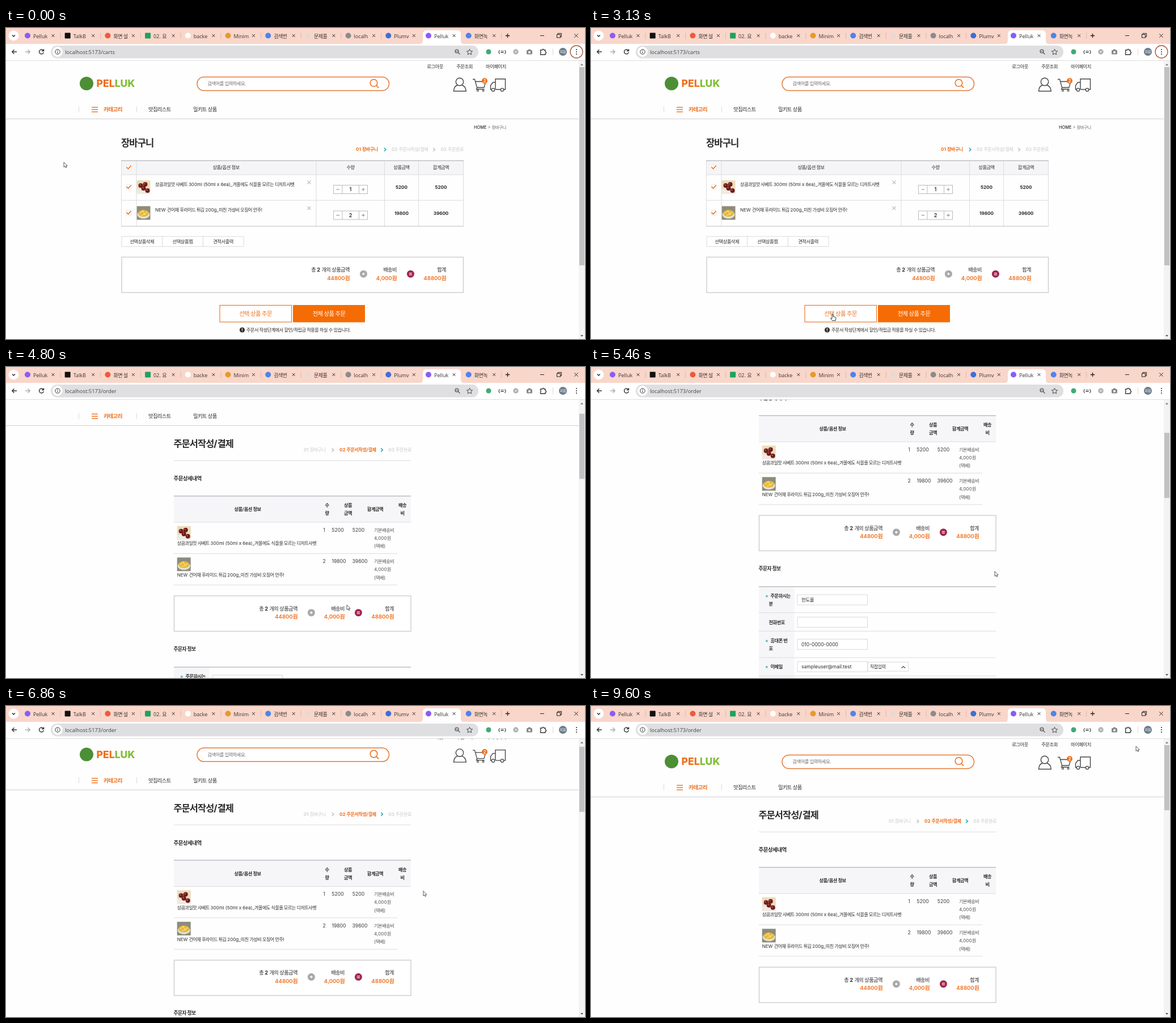
Recreate the animation shown at these times as an HTML page. Size 1021 by 549 pixels, loop 9670 ms.

```html
<!DOCTYPE html>
<html lang="ko">
<head>
<meta charset="utf-8">
<title>장바구니</title>
<style>
  html, body { margin: 0; width: 100%; height: 100%; overflow: hidden; background: #fefefe; }
  svg { display: block; width: 1021px; height: 549px; }
  text { font-family: Inter, "Noto Sans CJK KR", "Noto Sans CJK", sans-serif; white-space: pre; }
  .ui { font-family: "Open Sans", "Noto Sans CJK KR", "Noto Sans CJK", sans-serif; }
</style>
</head>
<body>
<svg id="stage" viewBox="0 0 1021 549"></svg>
<script>
const LOOP = 9670, NAVIGATE = 3560;
const ORANGE = '#ee6f1c', INK = '#2b2b2b', GRAY = '#c9c9cb', TEAL = '#48b0b8';

// Drawing helpers, each returning SVG markup
const text = (x, y, s, size = 8.2, { fill = INK, weight = 400, anchor = 'start', cls = '' } = {}) =>
  `<text x="${x}" y="${y}" font-size="${size}" fill="${fill}" font-weight="${weight}" text-anchor="${anchor}" class="${cls}">` +
  s.replace(/[가-힣][가-힣 ]*/g, run => `<tspan letter-spacing="-.056em">${run}</tspan>`) + '</text>';
const mid = (x, y, s, size, style) => text(x, y, s, size, { anchor: 'middle', ...style });
const end = (x, y, s, size, style) => text(x, y, s, size, { anchor: 'end', ...style });
const rect = (x1, y1, x2, y2, fill, stroke = 'none', width = 1, r = 0) =>
  `<rect x="${x1}" y="${y1}" width="${x2 - x1}" height="${y2 - y1}" rx="${r}" fill="${fill}" stroke="${stroke}" stroke-width="${width}"/>`;
const circle = (x, y, r, fill, stroke = 'none', width = 1) =>
  `<circle cx="${x}" cy="${y}" r="${r}" fill="${fill}" stroke="${stroke}" stroke-width="${width}"/>`;
const path = (d, stroke = INK, width = 1, fill = 'none') =>
  `<path d="${d}" fill="${fill}" stroke="${stroke}" stroke-width="${width}"/>`;
const hline = (x1, x2, y, color = '#dcdce0', width = 1) => path(`M${x1} ${y}H${x2}`, color, width);
const vline = (x, y1, y2, color = '#dcdce0', width = 1) => path(`M${x} ${y1}V${y2}`, color, width);
const cross = (x, y, r, color = INK, width = 1) =>
  path(`M${x - r} ${y - r}l${2 * r} ${2 * r}m0 ${-2 * r}l${-2 * r} ${2 * r}`, color, width);
const plus = (x, y, r, color = INK, width = 1) =>
  path(`M${x - r} ${y}h${2 * r}M${x} ${y - r}v${2 * r}`, color, width);
const chevron = (x, y, color) => path(`M${x - 1.7} ${y - 3}l3 3l-3 3`, color, 1.8);

const products = [
  { name: '상큼과일맛 샤베트 300ml (50ml x 6ea)_겨울에도 식을줄 모르는 디저트샤벳', count: '1', price: '5200', total: '5200', photo: sorbet },
  { name: 'NEW 건어채 후라이드 튀김 200g_미친 가성비 오징어 안주!', count: '2', price: '19800', total: '39600', photo: fries },
];

function sorbet(x, y) {
  const balls = [[7, 9], [15, 7], [12, 14], [19, 18]];
  return rect(x, y, x + 24, y + 24, '#ecdcb8') + rect(x, y + 15, x + 24, y + 24, '#f1e9e2') +
    balls.map(([dx, dy]) => circle(x + dx, y + dy, 4, '#6d1a1c') + circle(x + dx - 1, y + dy - 1, 1.3, '#b5564a')).join('');
}
function fries(x, y) {
  return rect(x, y, x + 24, y + 24, '#8d8c7c') +
    `<ellipse cx="${x + 12}" cy="${y + 15}" rx="11" ry="7" fill="#e5e2d3"/>` +
    `<ellipse cx="${x + 12}" cy="${y + 12.5}" rx="9.5" ry="6" fill="#e6b637"/>` +
    path(`M${x + 5} ${y + 13}l6-5l3 6l5-4M${x + 8} ${y + 16}l8-2`, '#f7db78', 1.6);
}

function browser() {
  const tabs = [['#8a5cf6', 'Pelluk'], ['#111', 'TalkB', 1], ['#ee5a3c', '화면 설'], ['#1ca45c', '02. 요', 1],
    ['#fff', 'backe'], ['#e79a2c', 'Minim'], ['#4c84ee', '검색번'], ['#e6d9d4', '문제풀'],
    ['#8b8b8d', 'localh'], ['#3d6fd6', 'Plumv'], ['#8a5cf6', 'Pelluk'], ['#4c84ee', '화면녹']];
  let s = rect(0, 0, 1021, 29, '#f9d6ca') + rect(0, 28, 1021, 57, '#fff') + hline(0, 1021, 57.5, '#dedede') +
    circle(13.5, 13.5, 9, '#fff') + path('M11 12.5l2.5 2.5l2.5-2.5', '#222', 1.3) +
    path('M728 29Q735 29 735 22V11Q735 4 742 4H795Q802 4 802 11V22Q802 29 809 29Z', 'none', 0, '#fff');
  tabs.forEach(([color, title, square], i) => {
    const x = 38 + i * 70.7;
    s += square ? rect(x - 5, 8.5, x + 5, 18.5, color, 'none', 0, 1) : circle(x, 13.5, 5, color);
    s += text(x + 10, 17.5, title, 9, { fill: '#3a3330', cls: 'ui' }) + cross(x + 45, 13.5, 2.4, '#2d2725');
    if (i < 9 || i == 11) s += vline(x + 58, 8, 19, '#dfb8ab');
  });
  s += plus(884.5, 13.5, 3.7, '#222', 1.3) + hline(942, 949, 13.5, '#222') +
    rect(971.5, 11.5, 977.5, 17, 'none', '#222') + path('M973 11V9.5H979.5V15.5H978', '#222') + cross(1005.5, 13.5, 3.2, '#222');

  s += path('M19 42H11M14.5 38.3L10.8 42l3.7 3.7', '#333', 1.4) + path('M34 42h8M38.5 38.3l3.7 3.7l-3.7 3.7', '#aaa', 1.3) +
    path('M65.7 39.5A4 4 0 1 0 66.4 43M66.5 37.2V40.5H63', '#333', 1.4) +
    rect(79, 31, 833, 53.5, '#dfdfe1', 'none', 0, 11) + circle(91, 42, 9, '#fff') + circle(91, 42, 4.2, 'none', '#333') +
    path('M91 41.5v2.7M91 39.3v1.1', '#333', 1.1) +
    `<text id="url" x="104" y="45.7" font-size="9.4" fill="#444" class="ui"></text>` +
    circle(795, 41, 3, 'none', '#444', 1.1) + path('M797.3 43.3l3.2 3.2M793.5 41h3', '#444', 1.1) +
    path('M817.5 37.3l1.5 3.3l3.6.4l-2.7 2.4l.8 3.5l-3.2-1.8l-3.2 1.8l.8-3.5l-2.7-2.4l3.6-.4Z', '#444');
  s += circle(851, 42, 4.5, '#41a878') + mid(875, 45, '{≡}', 7.5, { fill: '#333', weight: 700 }) +
    circle(899, 42, 4.7, '#aeb0b2') + cross(899, 42, 2, '#eee') +
    rect(918, 39, 928, 46.5, '#85888c', 'none', 0, 1.5) + rect(921, 37.5, 925, 40, '#85888c') + circle(923, 42.7, 2, '#fff') +
    path('M942.5 39h3a1.6 1.6 0 0 1 3.2 0h2.3v2.8a1.6 1.6 0 0 1 0 3.2v2h-8.5v-2.7a1.5 1.5 0 0 0 0-2.6Z', '#333', 1.3) +
    vline(964.5, 36, 48, '#f3d2c6') + circle(982, 42, 7, '#6b7c8b') + mid(982, 44.3, '회원', 6, { fill: '#fff' }) +
    `<circle id="alert" cx="1006" cy="42" r="11" fill="#fff" stroke="#a9543c" stroke-width="1.3"/>` +
    [38, 42, 46].map(y => circle(1006, y, 1.1, '#333')).join('');
  return s + rect(1010, 58, 1021, 549, '#f3f3f4') + `<rect id="thumb" x="1011" width="9" fill="#c1c1c3"/>` +
    path('M1013 66l2.5-3l2.5 3Z', 'none', 0, '#777') + path('M1013 542l2.5 3l2.5-3Z', 'none', 0, '#555');
}

function siteHeader() {
  const cartAndTruck =
    path('M823 90.5h3.5l4 14.5h12.5l3-10.5H828M831 105l-1.5 3h14', '#444', 1.3) +
    circle(832, 110.5, 1.5, '#fff', '#444', 1.1) + circle(841.5, 110.5, 1.5, '#fff', '#444', 1.1) +
    circle(844, 93.3, 5, ORANGE) + mid(844, 96, '2', 7.5, { fill: '#fff', weight: 600 }) +
    path('M863 108.5V90H880.5V108.5H863.5M863 96h-4.5l-4 5.5v7h2', '#444', 1.4) +
    circle(859, 109, 2.7, '#fff', '#444', 1.3) + circle(875, 109, 2.7, '#fff', '#444', 1.3);
  return mid(756.5, 70.7, '로그아웃', 8.3) + mid(808.5, 70.7, '주문조회', 8.3) + mid(864, 70.7, '마이페이지', 8.3) +
    circle(142, 98, 12, '#4c8f35') +
    text(159.5, 104.3, 'PEL<tspan fill="#80be35">LUK</tspan>', 17.6, { fill: ORANGE, weight: 800 }) +
    rect(337, 86.5, 675.5, 110.5, '#fff', '#e17a35', 1.5, 12) + text(355.5, 101.2, '검색어를 입력하세요.', 8.2, { fill: '#6a6a6a' }) +
    circle(648.5, 97, 6.3, 'none', ORANGE, 1.6) + path('M653 101.5l4.2 4.2', ORANGE, 1.7) +
    circle(800, 95, 6.7, 'none', '#444', 1.4) + path('M796 101Q790 102.5 789.5 111.5H811.3Q810.5 102.5 804 101', '#444', 1.4) +
    cartAndTruck + vline(128.5, 138, 149) + vline(230.5, 138, 149) +
    [140, 144, 148].map(y => hline(151, 162, y, ORANGE, 1.4)).join('') +
    text(172, 147, '카테고리', 9.6, { fill: ORANGE, weight: 600 }) +
    text(251, 147, '맛집리스트', 9.2, { weight: 500 }) + text(330, 147, '밀키트 상품', 9.2, { weight: 500 }) +
    hline(0, 1010, 160.5, '#cfcfd2');
}

function steps(xs, y, current) {
  const labels = ['01 장바구니', '02 주문서작성/결제', '03 주문완료'];
  return labels.map((label, i) =>
    text(xs[i], y, label, 8.1, i == current ? { fill: ORANGE, weight: 700 } : { fill: GRAY, weight: 500 }) +
    (i < 2 ? chevron(xs[i + 1] - 11.5, y - 2.7, i == current ? TEAL : GRAY) : '')).join('');
}

function summary(left, right, y, ends) {
  const parts = [['총 <tspan font-weight="700">2</tspan> 개의 상품금액', '44800원'], ['배송비', '4,000원'], ['합계', '48800원']];
  const [p, e] = [ends[0] + 24.4, ends[1] + 24.4], cy = y + 29.7;
  return rect(left + .5, y, right - .5, y + 62.5, '#fff', '#cdcdd3', 1.4) +
    parts.map(([label, value], i) => end(ends[i], y + 25.5, label, 9.2, { weight: 500 }) +
      end(ends[i], y + 40, value, 9.6, { fill: ORANGE, weight: 600 })).join('') +
    circle(p, cy, 6.5, '#a9a9ab') + plus(p, cy, 2.4, '#fff', 1.4) +
    circle(e, cy, 6.5, '#a1264e') + path(`M${e - 2.5} ${cy - 1.4}h5m-5 2.8h5`, '#fff', 1.2);
}

function cartPage() {
  const head = { weight: 500 }, bold = { weight: 700 };
  const check = y => rect(212, y - 4.5, 221, y + 4.5, '#fff', '#e3e3e6', .8, 1) + path(`M212.5 ${y - .5}l3 3l5-5.5`, ORANGE, 1.6);
  let s = end(882, 177.7, `<tspan fill="${INK}" font-weight="500">HOME</tspan> &gt; 장바구니`, 7.4, { fill: '#666' }) +
    text(203, 209, '장바구니', 16.6, bold) + steps([617, 680, 766.5], 217.3, 0) +
    rect(203.5, 234, 806.5, 259, '#f5f5f7') + check(246) +
    mid(388, 249.3, '상품/옵션 정보', 8.2, head) + mid(607.5, 249.3, '수량', 8.2, head) +
    mid(697.5, 249.3, '상품금액', 8.2, head) + mid(767, 249.3, '합계금액', 8.2, head);
  products.forEach((p, i) => {
    const y = 259 + i * 45.5;
    s += check(y + 21.5) + p.photo(230.5, y + 10) + text(263, y + 19.7, p.name, 8) + cross(534.5, y + 13.5, 3, '#888', .9) +
      rect(577.5, y + 18.5, 637.5, y + 33.5, '#fff', '#bbb') + vline(593, y + 18.5, y + 33.5, '#bbb') + vline(622.5, y + 18.5, y + 33.5, '#bbb') +
      hline(582.5, 588, y + 26, '#888') + plus(630, y + 26, 2.7, '#888') + mid(607.5, y + 29.2, p.count, 9, { weight: 600 }) +
      mid(697.5, y + 25.2, p.price, 8.1, bold) + mid(767, y + 25.2, p.total, 8.1, bold);
  });
  s += [203.5, 230, 547, 667.5, 727.5, 806.5].map(x => vline(x, 234, 350)).join('') +
    hline(203, 807, 234.2, '#bfbfc6', 1.4) + hline(203, 807, 259) + hline(203, 807, 304.2) + hline(203, 807, 350, '#bfbfc6', 1.2);
  ['선택상품삭제', '선택상품찜', '견적서출력'].forEach((label, i) => {
    const x = 204 + i * 71.7;
    s += rect(x, 368, x + 71.7, 385.7, '#fff', '#dcdce2') + mid(x + 35.7, 380, label, 8.3, { weight: 500 });
  });
  return s + summary(203.5, 807, 404.5, [606, 689, 776]) +
    rect(377, 489.5, 503.5, 519, '#fff', ORANGE, 1.1) + mid(440, 508, '선택 상품 주문', 10.3, { fill: ORANGE, weight: 500 }) +
    rect(506, 489, 633, 519.5, '#f56c05') + mid(569.5, 508, '전체 상품 주문', 10.3, { fill: '#fff', weight: 500 }) +
    circle(416.5, 533, 4.6, '#333') + mid(416.5, 535.6, '!', 7.2, { fill: '#fff', weight: 700 }) +
    text(424, 536, '주문서 작성단계에서 할인/적립금 적용을 하실 수 있습니다.', 8.1);
}

function orderPage() {
  const head = { weight: 600 }, soft = { fill: '#555' }, num = { fill: '#555', weight: 500 };
  let s = text(295.5, 198, '주문서작성/결제', 16.4, { weight: 700 }) + steps([525, 588, 674.5], 206.2, 1) +
    hline(296, 714, 222.3) + text(295.5, 257.3, '주문상세내역', 9.5, { weight: 700 }) +
    rect(296, 284.5, 714, 331, '#f6f6f8') + hline(296, 714, 284.7, '#bdbdc4', 1.4) + hline(296, 714, 331) +
    mid(426, 311.2, '상품/옵션 정보', 8.2, head) + mid(651, 311.2, '합계금액', 8.2, head);
  [[566, '수', '량'], [603, '상품', '금액'], [699, '배송', '비']].forEach(([x, a, b]) =>
    s += mid(x, 304, a, 8.2, head) + mid(x, 318.2, b, 8.2, head));
  products.forEach((p, i) => {
    const y = 331 + i * 55.5;
    s += p.photo(301.7, y + 6.8) + text(301.7, y + 40.4, p.name, 8) + mid(561, y + 16.6, p.count, 8.5, num) +
      mid(i ? 587 : 585, y + 16.6, p.price, 8.5, num) + mid(i ? 624 : 621.5, y + 16.6, p.total, 8.5, num) +
      ['기본배송비', '4,000원', '(택배)'].map((line, k) => text(649, y + 16.6 + k * 14.2, line, 8.2, soft)).join('') +
      hline(296, 690, y + 55.3);
  });
  s += summary(296, 714.5, 461, [514, 597, 684]) + text(295.5, 557.6, '주문자 정보', 8.7, { weight: 700 }) +
    rect(296, 586.5, 358.5, 800, '#f6f6f8') + hline(296, 714, 586.7, '#bdbdc4', 1.4);
  const rows = [[632.7, 610, ['주문하시는', '분'], '한도율'], [665.3, 649.5, ['전화번호'], '', true],
    [712, 688.5, ['휴대폰 번', '호'], '010-0000-0000'], [744.3, 728, ['이메일'], 'sampleuser@mail.test']];
  for (const [bottom, y, [first, second], value, optional] of rows) {
    const base = second ? y - 4 : y + 3;
    s += hline(296, 714, bottom) + rect(364, y - 9, 487.5, y + 9, '#fff', '#d9d9de') + text(371, y + 3, value, 8.5) +
      text(optional ? 313.5 : 316.5, base, first, 8.2, head) + (second ? text(313.5, base + 14.2, second, 8.2, head) : '') +
      (optional ? '' : mid(310, base + .2, '★', 6.5, { fill: TEAL }));
  }
  return s + rect(488, 720, 559.5, 736, '#fff', '#d9d9de') + text(492, 730.7, '직접입력', 7.9) + path('M547.5 730.5l3.3-3l3.3 3', '#444', 1.2);
}

const stage = document.getElementById('stage');
stage.innerHTML = rect(0, 0, 1021, 549, '#fefefe') +
  `<g id="page">${siteHeader()}<g id="cart">${cartPage()}</g><g id="order">${orderPage()}</g></g>` + browser() +
  `<g id="arrow">${path('M0 0V8.6L2 6.8L3.4 9.8L4.8 9.1L3.5 6.3H6.2Z', '#333', .8, '#fff')}</g>` +
  `<g id="hand">${path('M-1 1Q-1 0 0 0T1 1V4.5L5 5.4Q6 5.7 6 6.8L5.2 11.5H-.5L-3.6 7.5Q-3.4 6 -1 7.8Z', '#222', .9, '#fff')}</g>`;
const $ = id => document.getElementById(id);
const show = (id, on) => $(id).setAttribute('visibility', on ? 'visible' : 'hidden');
const move = (id, x, y) => $(id).setAttribute('transform', `translate(${x} ${y})`);

// Keyframes are [time, ...values], eased between neighbours
function track(keys, t) {
  const i = keys.findIndex(k => k[0] > t);
  if (i < 0) return keys.at(-1).slice(1);
  const [a, b] = [keys[i - 1], keys[i]], u = (t - a[0]) / (b[0] - a[0]), e = u * u * (3 - 2 * u);
  return a.slice(1).map((v, k) => v + (b[k + 1] - v) * e);
}
const pointer = [[0, 102, 237], [300, 102, 237], [1350, 484, 465], [1800, 484, 465], [2600, 426, 505], [3600, 426, 505],
  [4500, 601, 420], [4900, 601, 420], [5800, 764, 333], [6700, 764, 333], [7650, 396, 249], [8200, 396, 249], [9500, 961, 71]];
// One wheel notch, a short rest, then the rest of the way down
const scrolling = [[0, 0], [4600, 0], [4740, 57], [4830, 57], [5040, 199], [6420, 199], [6940, 0]];

function frame(now) {
  const t = now % LOOP, inCart = t < NAVIGATE;
  const [x, y] = track(pointer, t);
  const [scroll] = track(scrolling, t);
  const overButton = inCart && x > 377 && x < 503 && y > 489 && y < 519;
  show('cart', inCart);
  show('order', !inCart);
  show('alert', inCart);
  show('hand', overButton);
  show('arrow', !overButton);
  move('page', 0, -scroll);
  move('arrow', x, y);
  move('hand', x, y);
  $('url').textContent = 'localhost:5173/' + (inCart ? 'carts' : 'order');
  $('thumb').setAttribute('y', 69 + scroll * .237);
  $('thumb').setAttribute('height', inCart ? 350 : 115);
  requestAnimationFrame(frame);
}
requestAnimationFrame(frame);
</script>
</body>
</html>
```
